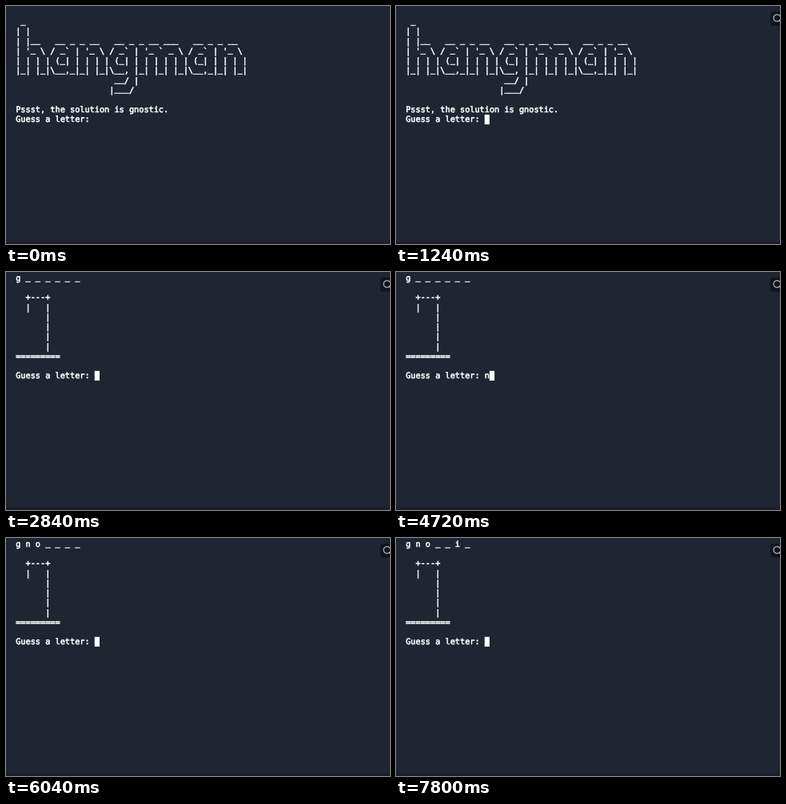
Write an HTML page that moves like this. It is 480 by 298 pixels and loops after 8 s.

```html
<!DOCTYPE html>
<html lang="en">
<head>
<meta charset="utf-8">
<title>Hangman</title>
<style>
html, body { margin: 0; width: 100%; height: 100%; overflow: hidden; background: #1f2531; }
svg { display: block; width: 480px; height: 298px; }
text {
  font: 10.24px "DejaVu Sans Mono", monospace;
  white-space: pre;
  text-rendering: geometricPrecision;
  fill: #fff;
  stroke: #fff;
  stroke-width: .55px;
}
</style>
</head>
<body>
<pre id="banner" hidden>
 _
| |
| |__   __ _ _ __   __ _ _ __ ___   __ _ _ __
| '_ \ / _` | '_ \ / _` | '_ ` _ \ / _` | '_ \
| | | | (_| | | | | (_| | | | | | | (_| | | | |
|_| |_|\__,_|_| |_|\__, |_| |_| |_|\__,_|_| |_|
                    __/ |
                   |___/
</pre>
<svg viewBox="0 0 480 298">
  <rect width="480" height="298" fill="#1f2531"/>
  <rect y="295" width="480" height="3" fill="#1d1d2b"/>
  <g id="lines"></g>
  <rect id="cursor" width="6.2" height="12.2" fill="#fff"/>
  <g id="search">
    <rect x="468" y="7" width="20" height="17.5" rx="3" fill="#10141d"/>
    <g fill="none" stroke="#d4d6da" stroke-width="1.1">
      <circle cx="476.3" cy="15" r="4.3"/>
      <path d="M479.3 18.2l3 3"/>
    </g>
  </g>
</svg>
<script>
const LOOP = 8000, LEFT = 12.2, CELL = 6.165, ROW = 12.22;
const $ = id => document.getElementById(id);
const banner = $("banner").textContent.replace(/^\n/, "").trimEnd().split("\n");
const prompt = "Guess a letter: ";

const intro = ["", ...banner, "", "Pssst, the solution is gnostic.", prompt];
const gallows = word => [
  word, "", "  +---+", "  |   |",
  ...Array(4).fill("      |"), "=========", "", prompt
];

// start time, screen, typed letter
const steps = [
  [0, intro, ""],
  [1240, intro, ""],
  [2360, intro, "g"],
  [2840, gallows("g _ _ _ _ _ _"), ""],
  [4720, gallows("g _ _ _ _ _ _"), "n"],
  [4960, gallows("g n _ _ _ _ _"), ""],
  [5640, gallows("g n _ _ _ _ _"), "o"],
  [6040, gallows("g n o _ _ _ _"), ""],
  [7560, gallows("g n o _ _ _ _"), "i"],
  [7800, gallows("g n o _ _ i _"), ""]
];

function addText(str, y) {
  if (!str.trim()) return;
  const el = document.createElementNS("http://www.w3.org/2000/svg", "text");
  el.setAttribute("x", LEFT);
  el.setAttribute("y", y);
  el.textContent = str;
  $("lines").append(el);
}

function show(index) {
  const [, screen, typed] = steps[index];
  const last = screen.length - 1;
  $("lines").replaceChildren();
  screen.forEach((line, row) => {
    const str = row === last ? line + typed : line;
    const base = 11 + row * ROW;
    addText(str.replace(/_/g, " "), base);
    // underscores sit close to the baseline
    addText(str.replace(/[^_]/g, " "), base - 1.5);
  });
  $("cursor").setAttribute("x", LEFT - .1 + (prompt.length + typed.length) * CELL);
  $("cursor").setAttribute("y", 1.6 + last * ROW);
  const visible = index ? "visible" : "hidden";
  $("cursor").style.visibility = $("search").style.visibility = visible;
}

const start = performance.now();
let current = -1;
function tick() {
  const t = (performance.now() - start) % LOOP;
  const index = steps.findLastIndex(step => step[0] <= t);
  if (index !== current) show(current = index);
  requestAnimationFrame(tick);
}
tick();
</script>
</body>
</html>
```
